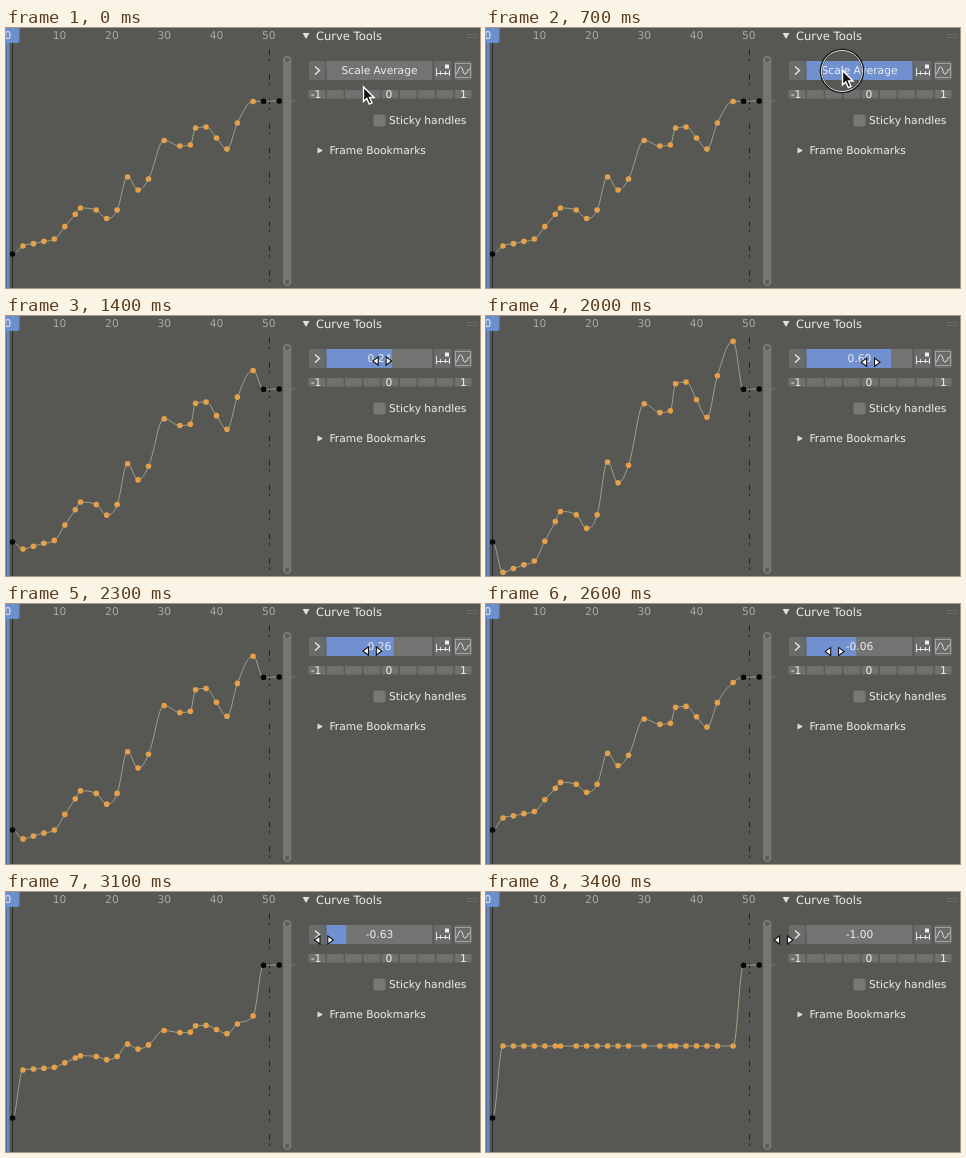
These frames come from a looping animation (474x260 px, 3.5 s). An HTML page:

```html
<!DOCTYPE html>
<html lang="en">
<head>
<meta charset="utf-8">
<title>Curve Tools</title>
<style>
html, body { margin: 0; width: 100%; height: 100%; overflow: hidden; background: #575753; }
svg { display: block; font: 10.7px "DejaVu Sans", sans-serif; fill: #eee; text-rendering: geometricPrecision; }
.mid { text-anchor: middle; }
.icon { fill: none; stroke: #e4e4e4; }
</style>
</head>
<body>
<svg id="stage" width="474" height="260" viewBox="0 0 474 260">
  <rect width="474" height="260" fill="#575753"/>
  <g id="ruler" class="mid" fill="#a9a9a6"></g>
  <path d="M6.5 14V260" stroke="#2c2c2a"/>
  <path d="M263.5 22V260" stroke="#20201e" stroke-dasharray="5 4 2 13.5"/>
  <path d="M273 73H289" stroke="#7c7c72"/>
  <path id="curve" fill="none" stroke="#a0a288"/>
  <g id="keys"></g>
  <path d="M2 10V260" stroke="#6488c8" stroke-width="3"/>
  <rect x="-10" y="-4" width="23.5" height="19" rx="3" fill="#6b8fcd"/>
  <text class="mid" x="2" y="11">0</text>
  <rect x="277" y="28" width="8.5" height="230" rx="4.2" fill="#757573"/>
  <g fill="#5c5c59" stroke="#858583"><circle cx="281.2" cy="32" r="3"/><circle cx="281.2" cy="254" r="3"/></g>

  <path d="M296.5 5H303.5L300 11Z" fill="#dedede"/>
  <text x="310" y="11.5" font-size="11.5">Curve Tools</text>
  <path d="M461 6.5H471M461 9.5H471" stroke="#777773" stroke-dasharray="1.5 1.5"/>

  <rect x="303" y="33" width="16.5" height="19" rx="2" fill="#6b6b69"/>
  <path d="M309 38.5L313.5 42.5L309 46.5" class="icon" stroke-width="1.5"/>
  <rect x="320.5" y="33" width="106" height="19" fill="#737371"/>
  <rect id="fill" x="320.5" y="33" height="19" fill="#7090cf"/>
  <text id="label" class="mid" x="373.5" y="46"></text>
  <rect x="428" y="33" width="17.5" height="19" fill="#6b6b69"/>
  <path d="M430.5 40V48M443.5 42V48M434.5 43V47M439.5 43V47M430.5 45.5H443.5" class="icon"/>
  <rect x="439" y="36.5" width="4" height="4"/>
  <rect x="448" y="33" width="18" height="19" rx="2" fill="#6b6b69"/>
  <rect x="449.5" y="35.5" width="15" height="14" fill="none" stroke="#a2a2a0"/>
  <path d="M450 46C452 46 452 39 454.5 39S456.5 46 459 46S461 41 464 41" class="icon"/>

  <g id="steps" fill="#70706e"></g>
  <g class="mid"><text x="310" y="70">-1</text><text x="383" y="70">0</text><text x="457.5" y="70">1</text></g>
  <rect x="367.5" y="86.5" width="12" height="12" rx="2" fill="#787876"/>
  <text x="383" y="96.3">Sticky handles</text>
  <path d="M311.5 119.5V125.5L317 122.5Z" fill="#dedede"/>
  <text x="323.5" y="126.3">Frame Bookmarks</text>

  <g id="ring" fill="none" transform="translate(356 43)">
    <circle r="21" stroke="#1b1b1b" stroke-width="2.6"/>
    <circle r="20.5" stroke="#e8e8e8"/>
  </g>
  <path id="pointer" d="M0 0V14.5L3.3 11.5L5.8 17L8.5 15.8L6 10.5H10.5Z" fill="#111" stroke="#fff" stroke-width="1.4"/>
  <path id="dragger" d="M-4.5 -3V3L-8.5 0ZM4.5 -3V3L8.5 0Z" fill="#fff" stroke="#111" stroke-width="2.2" paint-order="stroke"/>
</svg>
<script>
const NS = "http://www.w3.org/2000/svg";
const LOOP = 3500, STEP = 100, AVERAGE = 154, HANDLE = 0.39;
const PRESS = 600, DRAG = 900, TURN = 2000, END = 3400, PEAK = 0.598;

const $ = id => document.getElementById(id);
const add = (parent, tag, attrs) => {
  const node = document.createElementNS(NS, tag);
  for (const name in attrs) node.setAttribute(name, attrs[name]);
  return parent.appendChild(node);
};
const show = (id, on) => $(id).setAttribute("visibility", on ? "visible" : "hidden");
const move = (id, x, y) => $(id).setAttribute("transform", `translate(${x} ${y})`);
const mix = (a, b, u) => a + (b - a) * u;
const progress = (t, from, to) => Math.min(1, Math.max(0, (t - from) / (to - from)));
const ease = u => (1 - Math.cos(Math.PI * u)) / 2;
const everySecond = (from, to) =>
  Array.from({ length: (to - from) / 2 + 1 }, (_, i) => from + 2 * i);
const frameX = frame => 1.3 + 5.23 * frame;

// Bends of the curve as frame: height; keys between them lie on straight lines
const bends = Object.entries({
  1: 226, 3: 218, 9: 211, 14: 180, 17: 182, 19: 190.5, 21: 182, 23: 149, 25: 162,
  27: 151, 30: 112.5, 33: 118, 35: 117, 36: 100, 38: 99, 42: 121, 44: 95, 47: 73.5, 52: 73
}).map(([frame, y]) => [+frame, y]);

function heightAt(frame) {
  const i = Math.max(1, bends.findIndex(bend => bend[0] >= frame));
  const [f0, y0] = bends[i - 1], [f1, y1] = bends[i];
  return mix(y0, y1, progress(frame, f0, f1));
}

const points = [
  ...everySecond(1, 13), 14, ...everySecond(17, 27), 30, 33, 35, ...everySecond(36, 44), 47, 49, 52
].map(frame => ({ x: frameX(frame), y: heightAt(frame), fixed: frame < 3 || frame > 47 }));

for (let n = 10; n <= 50; n += 10)
  add($("ruler"), "text", { x: frameX(n), y: 11 }).textContent = n;
for (let i = 0; i < 9; i++)
  add($("steps"), "rect", { x: 302.5 + 18.25 * i, y: 62, width: 17, height: 8.5, rx: 1 });
const dots = points.map(({ x, fixed }) =>
  add($("keys"), "circle", { cx: x, r: 2.8, fill: fixed ? "#080808" : "#e4a04a" }));

// Auto-clamped tangent: flat at extremes, limited by both neighbours
function tangent(p, i) {
  if (i === 0 || i === p.length - 1) return 0;
  const slope = (a, b) => (b.y - a.y) / (b.x - a.x);
  const before = slope(p[i - 1], p[i]), after = slope(p[i], p[i + 1]);
  if (before * after <= 0) return 0;
  const limit = Math.min(Math.abs(before), Math.abs(after)) / HANDLE;
  return Math.sign(before) * Math.min(Math.abs(before + after) / 2, limit);
}

function drawCurve(amount) {
  const p = points.map(({ x, y, fixed }) =>
    ({ x, y: fixed ? y : AVERAGE + (y - AVERAGE) * (1 + amount) }));
  let d = `M${p[0].x} ${p[0].y}`;
  for (let i = 1; i < p.length; i++) {
    const a = p[i - 1], b = p[i], h = HANDLE * (b.x - a.x);
    d += `C${a.x + h} ${a.y + h * tangent(p, i - 1)} ${b.x - h} ${b.y - h * tangent(p, i)} ${b.x} ${b.y}`;
  }
  $("curve").setAttribute("d", d);
  p.forEach(({ y }, i) => dots[i].setAttribute("cy", y));
}

// Eases up to the peak, then falls almost evenly to -1
function amountAt(t) {
  if (t < TURN) return PEAK * ease(progress(t, 1020, 1900));
  const u = progress(t, TURN, END);
  return mix(PEAK, -1, u - 0.15 * u * u * (1 - u));
}

function render(t) {
  const pressed = t >= PRESS && t < DRAG, dragging = t >= DRAG;
  const amount = amountAt(t);
  drawCurve(amount);
  $("fill").setAttribute("width", 106 * (dragging ? (amount + 1) / 2 : +pressed));
  $("label").textContent = dragging ? amount.toFixed(2) : "Scale Average";

  const approach = progress(t, 0, 300);
  move("pointer", mix(357.5, 356.5, approach), mix(59, 42.5, approach));
  const dragX = t < TURN ? mix(357, 384.7, ease(progress(t, DRAG, 1700))) : 352 + 54.5 * amount;
  move("dragger", dragX, mix(44, 48, progress(t, DRAG, 2800)));
  show("pointer", !dragging);
  show("ring", pressed);
  show("dragger", dragging);
}

const start = performance.now();
function tick() {
  const t = (performance.now() - start) % LOOP;
  render(Math.floor(t / STEP) * STEP);
  requestAnimationFrame(tick);
}
tick();
</script>
</body>
</html>
```
